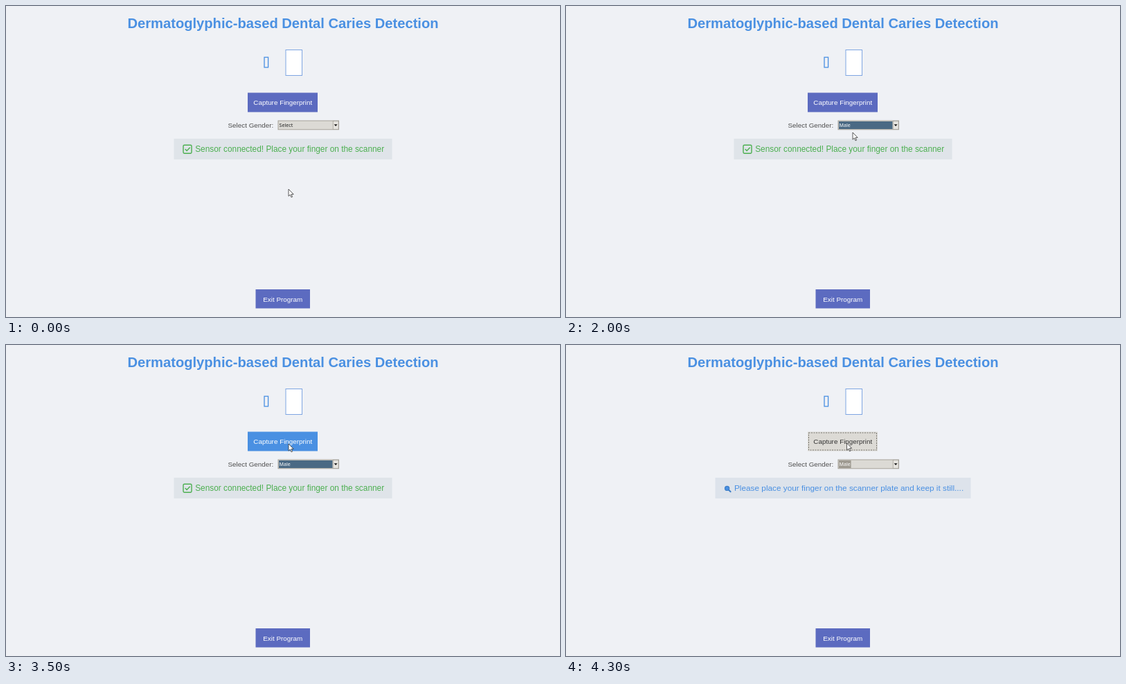
Write an HTML page that moves like this. It is 800 px wide and 450 px high and loops after 5000 ms.

```html
<!DOCTYPE html>
<html lang="en">
<head>
<meta charset="utf-8">
<title>Caries detection</title>
<style>
html, body { margin: 0; width: 100%; height: 100%; overflow: hidden; background: #eff1f5; }
svg { display: block; width: 800px; height: 450px; }
text { font: 9.87px "Liberation Sans", Arial, sans-serif; }
.mid { text-anchor: middle; }
.title { font-size: 20.17px; font-weight: bold; fill: #4a90e2; }
.status { font-size: 11.87px; }
.combo { font: 7.1px "Noto Sans", sans-serif; }
</style>
</head>
<body>
<svg viewBox="0 0 800 450">
  <rect width="800" height="450" fill="#eff1f5"/>
  <text class="title mid" x="400" y="32.4">Dermatoglyphic-based Dental Caries Detection</text>

  <rect x="373" y="74.2" width="5.6" height="14.6" fill="none" stroke="#4a90e2" stroke-width="1.3"/>
  <rect x="404" y="63.5" width="23.5" height="37" fill="#fff" stroke="#7ea5e2"/>

  <rect id="button" x="349" y="125.5" width="101" height="28"/>
  <rect id="focus" x="350.5" y="127" width="98" height="25" fill="none" stroke-dasharray="2 1.5"/>
  <text id="caption" class="mid" x="399.8" y="143.3">Capture Fingerprint</text>

  <text x="320.5" y="176.4" fill="#505050">Select Gender:</text>
  <rect x="393" y="166" width="87.5" height="12.8" fill="#dcdad5" stroke="#9e9a91" stroke-width=".9"/>
  <rect id="mark" x="394" y="167" height="11"/>
  <rect x="472.2" y="166.4" width="7.9" height="12" fill="#e6e4df" stroke="#9e9a91" stroke-width=".7"/>
  <path d="M473.7 171.2h4.8l-2.4 2.8z" fill="#111"/>
  <text id="choice" class="combo" x="394.6" y="175.2"></text>

  <g id="ready" fill="#4caf50">
    <rect x="242.5" y="192" width="315" height="30" fill="#dfe4e9"/>
    <g fill="none" stroke="#4caf50" stroke-width="1.4">
      <rect x="256" y="201.2" width="12" height="12" rx="1.6"/>
      <path d="M258.7 207l2.4 2.5 4.6-4.8"/>
    </g>
    <text class="status" x="273.2" y="211.2">Sensor connected! Place your finger on the scanner</text>
  </g>
  <g id="scan" fill="#4a90e2">
    <rect x="215.5" y="192" width="369" height="30" fill="#dde3eb"/>
    <path d="M234.6 209.3l3 3" stroke="#3f7fc8" stroke-width="2" stroke-linecap="round"/>
    <circle cx="232.6" cy="207.4" r="3.1" stroke="#3f7fc8" stroke-width="1.2"/>
    <text class="status" x="243" y="211.2" style="font-size:11.81px">Please place your finger on the scanner plate and keep it still....</text>
  </g>

  <rect x="360.5" y="410" width="78.5" height="27.5" fill="#5c6bc0"/>
  <text class="mid" x="399.8" y="427.6" fill="#fff">Exit Program</text>

  <path id="cursor" d="M0 0V10.2L2.4 8 4 11.8 5.6 11.1 4 7.4H7.2Z" fill="#fff" stroke="#333" stroke-width=".8"/>
</svg>
<script>
const $ = id => document.getElementById(id);
const set = (id, attrs) => {
  for (const name in attrs) $(id).setAttribute(name, attrs[name]);
};

// Pointer stops: time, x, y
const stops = [
  [0, 408, 265], [600, 408, 265], [1200, 414, 174], [1300, 414, 174],
  [1700, 414, 183], [2000, 414, 183], [2500, 410.5, 150], [2800, 410, 148],
  [3000, 410, 148], [3300, 408, 143.5], [3500, 408, 143], [4000, 406, 142],
  [4300, 405.5, 142], [5000, 405.5, 142]
];

function pointer(t) {
  const i = stops.findIndex(stop => stop[0] > t);
  const [t0, x0, y0] = stops[i - 1], [t1, x1, y1] = stops[i];
  const u = (t - t0) / (t1 - t0), ease = u * u * (3 - 2 * u);
  return [x0 + (x1 - x0) * ease, y0 + (y1 - y0) * ease];
}

function draw(now) {
  const t = Math.floor(now % 5000 / 100) * 100;
  const [x, y] = pointer(t);
  const chosen = t >= 2000, pressed = t >= 4000, scanning = t >= 4100;
  const hover = y < 153;

  set('cursor', { transform: `translate(${x} ${y})` });
  set('button', { fill: scanning ? '#dcdad5' : hover ? '#4a90e2' : '#5c6bc0' });
  set('focus', {
    visibility: pressed ? 'visible' : 'hidden',
    stroke: scanning ? '#77756f' : '#173b70'
  });
  set('caption', { fill: scanning ? '#333' : '#fff' });
  set('mark', {
    width: !chosen ? 0 : pressed ? 17.6 : 77.5,
    fill: pressed ? '#9e9a91' : '#4a6984'
  });
  set('choice', { fill: chosen ? '#fff' : '#222' });
  $('choice').textContent = chosen ? 'Male' : 'Select';
  set('ready', { visibility: scanning ? 'hidden' : 'visible' });
  set('scan', { visibility: scanning ? 'visible' : 'hidden' });
}

const start = performance.now();
function tick() {
  draw(performance.now() - start);
  requestAnimationFrame(tick);
}
tick();
</script>
</body>
</html>
```
